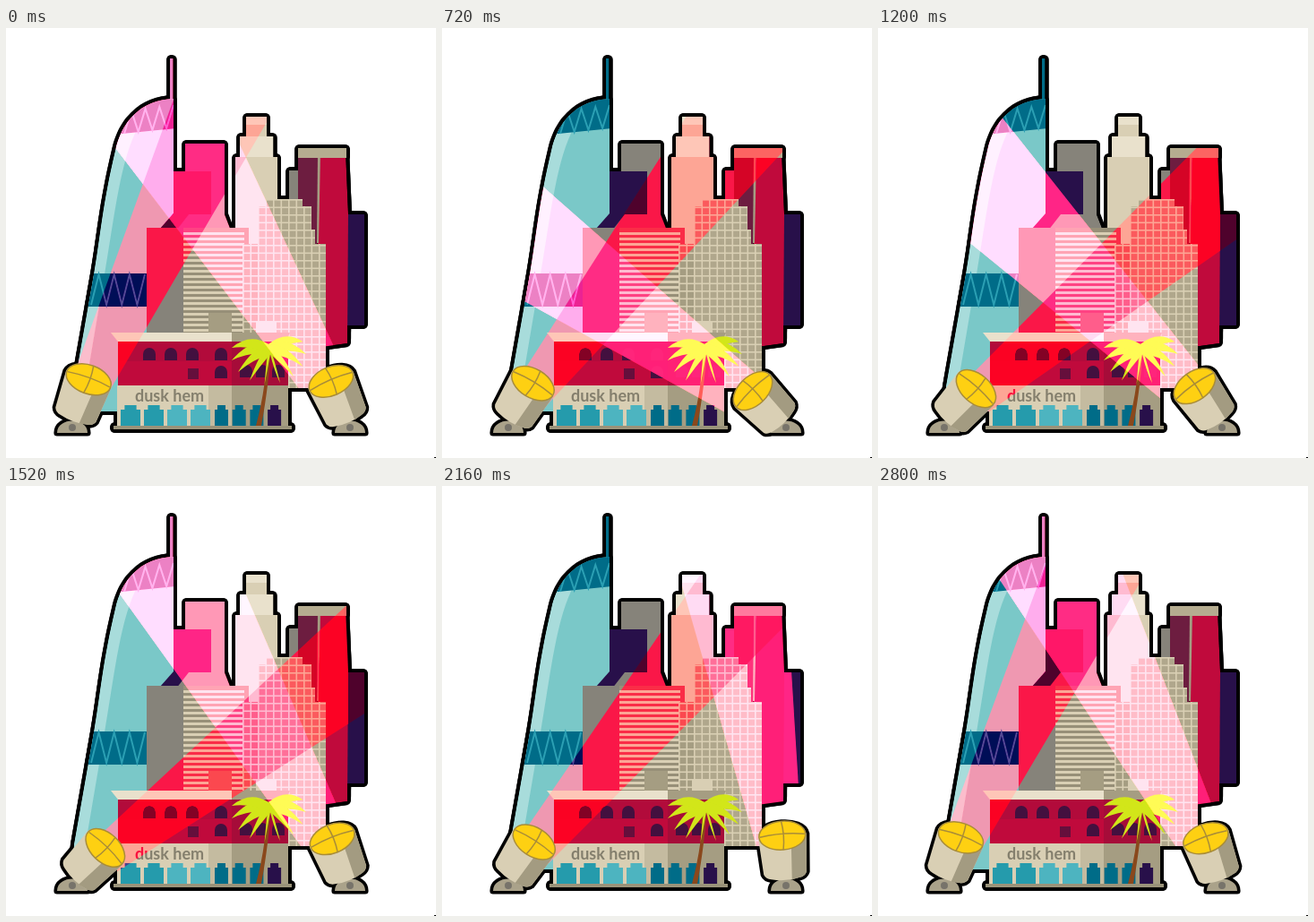
An HTML page with a canvas for the animation above (2.88 s loop, 480 by 480 pixels).

```html
<!DOCTYPE html>
<html lang="en">
<head>
<meta charset="utf-8">
<title>City lights</title>
<style>
html, body { margin: 0; width: 100%; height: 100%; overflow: hidden; background: #fff; }
canvas { display: block; width: 480px; height: 480px; }
</style>
</head>
<body>
<canvas id="stage" width="480" height="480"></canvas>
<script>
const SIZE = 480, LOOP = 2880, STEP = 80, BORDER = 3.6;
const RAD = Math.PI / 180, TAU = 2 * Math.PI;
const BEIGE = '#d9cfb4', PALE = '#e9e1cc', STONE = '#a59d82', GRAY = '#86837a';
const NAVY = '#28104a', TEAL = '#7ac8c8', DEEP = '#006c88', CRIMSON = '#c00a3c';

const makeLayer = () => {
  const c = document.createElement('canvas');
  c.width = c.height = SIZE;
  return c.getContext('2d');
};
const stage = document.getElementById('stage').getContext('2d');
const city = makeLayer(), outline = makeLayer(), lit = makeLayer();

function poly(g, color, ...points) {
  g.beginPath();
  points.forEach(p => g.lineTo(...p));
  g.closePath();
  g.fillStyle = color;
  g.fill();
}
function box(color, x, y, w, h) {
  city.fillStyle = color;
  city.fillRect(x, y, w, h);
}
function fill(g, color, path) {
  g.fillStyle = color;
  g.fill(path);
}
function zigzag(x, width, low, high, rise) {
  const n = 7;
  city.beginPath();
  for (let i = 0; i <= n; i++) city.lineTo(x + width * i / n, (i % 2 ? high : low) - rise * i / n);
  city.strokeStyle = '#2b9fb3';
  city.lineWidth = 2;
  city.stroke();
}

function drawTower() {
  const g = city;
  box(DEEP, 183, 34, 3.5, 50);
  g.save();
  g.clip(new Path2D('M187 79C150 80 129 105 122 137C108 195 105 235 98 275L76 400L74 428H187Z'));
  box(TEAL, 70, 75, 120, 355);
  fill(g, '#a8dcdb', new Path2D('M60 110H148C128 145 122 205 110 275L84 428H60Z'));
  poly(g, DEEP, [110, 70], [190, 70], [190, 112], [110, 120]);
  zigzag(132, 55, 118, 93, 7);
  box(DEEP, 85, 274, 100, 37);
  zigzag(95, 60, 309, 275, 0);
  g.restore();
}

function drawGrid() {
  const g = city, top = 191, pitch = 8.5;
  g.save();
  g.beginPath();
  g.rect(290, top, 41, 20);
  g.rect(281, 199, 60, 60);
  g.rect(281, 225, 64, 20);
  g.rect(264, 241, 93, 161);
  g.clip();
  box('#b0a78c', 260, top, 100, 212);
  box(STONE, 260, top, 21, 212);
  for (let d = 0; d < 212; d += pitch) {
    box(BEIGE, 264 + d, top, 1.6, 212);
    box(BEIGE, 260, top + d, 100, 1.6);
  }
  g.restore();
}

function drawSkyline() {
  const g = city;
  box(GRAY, 200, 129, 44, 90);
  box(NAVY, 187, 160, 42, 49);
  poly(g, NAVY, [187, 207], [210, 207], [210, 224], [172, 224]);
  poly(g, GRAY, [204, 208], [244, 208], [251, 226], [190, 226]);

  box(BEIGE, 256, 144, 47, 106);
  box(PALE, 261, 121, 37.5, 23);
  box(BEIGE, 268, 99, 23, 22);
  box(PALE, 268, 99, 23, 9);

  box(NAVY, 376, 208, 24, 124);
  box(GRAY, 316, 159, 12, 40);
  poly(g, CRIMSON, [350, 135], [379, 135], [382, 207], [381, 352], [345, 357]);
  poly(g, '#6d1d40', [326, 140], [351, 140], [347, 250], [326, 250]);
  poly(g, STONE, [348, 140], [351, 140], [349, 240], [347, 240]);
  box('#b5ac90', 326, 134, 54, 11);

  box(GRAY, 157, 223, 41, 120);
  box('#978f78', 198, 223, 73, 120);
  for (let y = 228; y < 340; y += 6) box(BEIGE, 198, y, 68, 3);
  drawGrid();
  box(STONE, 226, 318, 26, 26);
  box(BEIGE, 279, 328, 23, 16);
}

function arch(x, y) {
  const r = 7;
  city.beginPath();
  city.arc(x + r, y + r, r, Math.PI, 0);
  city.lineTo(x + 2 * r, y + 14);
  city.lineTo(x, y + 14);
  city.fillStyle = '#43103f';
  city.fill();
}
function shopWindow(color, x, w) {
  box(color, x + w * .2, 421, w * .6, 8);
  box(color, x, 426, w, 19);
}

function drawShop() {
  const g = city;
  box('#b20b3b', 125, 348, 127, 24);
  box(CRIMSON, 125, 372, 127, 28);
  box('#a60c39', 252, 348, 63, 52);
  poly(g, PALE, [117, 340], [252, 340], [252, 350], [125, 350]);
  poly(g, STONE, [252, 340], [317, 340], [313, 350], [252, 350]);
  for (let i = 0; i < 3; i++) {
    arch(153 + 24 * i, 357);
    arch(261 + 18 * i, 376);
  }
  box('#650f3c', 203, 380, 12, 12);
  arch(233, 357);
  arch(233, 377);

  box(BEIGE, 124, 399, 102, 46);
  box('#c4bba0', 226, 399, 26, 46);
  box(STONE, 252, 399, 63, 46);
  for (let i = 0; i < 4; i++) shopWindow(i < 2 ? '#259bac' : '#4db4c0', 128 + i * 26, 22);
  for (let i = 0; i < 4; i++) shopWindow(i < 3 ? DEEP : NAVY, 233 + i * 19.7, 15);
  box('#9a937a', 120, 444, 199, 4);
  g.fillStyle = '#847f6d';
  g.font = 'bold 18px Lato, "Open Sans", sans-serif';
  g.fillText('dusk hem', 144, 416.5);
}

function frond(angle) {
  const cx = 293, cy = 358;
  const x = cx + 42 * Math.cos(angle), y = cy + 6 + 34 * Math.sin(angle);
  const lift = 4 + 14 * Math.abs(Math.cos(angle));
  const mx = (cx + x) / 2, my = (cy + y) / 2 - lift;
  city.beginPath();
  city.moveTo(cx, cy - 5);
  city.quadraticCurveTo(mx, my, x, y);
  city.quadraticCurveTo(mx, my + 14, cx + 2, cy + 6);
  city.fillStyle = '#d2e619';
  city.fill();
}
function drawPalm() {
  fill(city, '#8a481c', new Path2D('M290 360Q292 395 279 444H285Q294 395 295 360Z'));
  for (let i = -1; i < 9; i++) frond(Math.PI * i / 7.5);
}

drawTower();
drawSkyline();
drawShop();
drawPalm();

for (let a = 0; a < 360; a += 10)
  outline.drawImage(city.canvas, BORDER * Math.cos(a * RAD), BORDER * Math.sin(a * RAD));
outline.globalCompositeOperation = 'source-in';
outline.fillRect(0, 0, SIZE, SIZE);

// Each lamp swings as a cosine: heading = mean + swing * cos(phase), in degrees from vertical.
const LAMPS = [
  { x: 74, y: 442, dir: 1, mean: 38.7, swing: 13.6, peak: .511, spread: 5.2, lag: 2,
    color: 'rgb(250,16,75)', mode: 'overlay' },
  { x: 384, y: 443, dir: -1, mean: 32.3, swing: 22.6, peak: .258, spread: 6.2, lag: 4,
    color: 'rgb(236,21,60)', mode: 'lighter' }
];
const heading = (lamp, phase) => lamp.mean + lamp.swing * Math.cos(TAU * (phase - lamp.peak));

function drawBeam(lamp, angle) {
  const back = 190, near = back + 45, far = 800;
  const k = Math.tan(lamp.spread * RAD);
  lit.save();
  lit.globalCompositeOperation = lamp.mode;
  lit.translate(lamp.x, lamp.y);
  lit.rotate(angle * lamp.dir * RAD);
  lit.translate(0, back);
  poly(lit, lamp.color, [-near * k, -near], [-far * k, -far], [far * k, -far], [near * k, -near]);
  lit.restore();
}

const BODY = new Path2D('M-27 -53C-25 -72 25 -72 27 -53L24 -11Q22 -6 16 -5Q0 -1 -16 -5Q-22 -6 -24 -11Z');
const SHADE = new Path2D('M27 -53L24 -11Q22 -6 16 -5L7 -3L9 -38Z');
const FOOT = new Path2D('M-17 452C-17 434 17 434 17 452Z');
const RIBS = new Path2D('M-25 -53Q0 -57 25 -53M0 -69Q3 -53 0 -37');

function inLampFrame(lamp, angle, draw) {
  stage.save();
  stage.translate(lamp.x, lamp.y);
  stage.rotate((angle * .88 - lamp.lag) * lamp.dir * RAD);
  draw();
  stage.restore();
}
function drawFoot(lamp, paint) {
  stage.save();
  stage.translate(lamp.x, 0);
  paint();
  stage.restore();
}
function paintFoot() {
  fill(stage, '#aaa28a', FOOT);
  stage.beginPath();
  stage.arc(0, 446, 4, 0, TAU);
  stage.fillStyle = '#77736a';
  stage.fill();
}
function paintLamp() {
  fill(stage, BEIGE, BODY);
  fill(stage, '#a39b81', SHADE);
  stage.beginPath();
  stage.ellipse(0, -53, 26, 16, 0, 0, TAU);
  stage.fillStyle = '#fed012';
  stage.fill();
  stage.strokeStyle = '#a98d38';
  stage.lineWidth = 1.5;
  stage.stroke();
  stage.stroke(RIBS);
}

function render(time) {
  const phase = Math.floor((time % LOOP) / STEP) * STEP / LOOP;
  const angles = LAMPS.map(lamp => heading(lamp, phase));

  lit.globalCompositeOperation = 'copy';
  lit.drawImage(city.canvas, 0, 0);
  LAMPS.forEach((lamp, i) => drawBeam(lamp, angles[i]));
  lit.globalCompositeOperation = 'destination-in';
  lit.drawImage(city.canvas, 0, 0);

  stage.fillStyle = '#fff';
  stage.fillRect(0, 0, SIZE, SIZE);
  stage.drawImage(outline.canvas, 0, 0);
  stage.strokeStyle = '#000';
  stage.lineJoin = 'round';
  stage.lineWidth = 2 * BORDER;
  LAMPS.forEach((lamp, i) => {
    inLampFrame(lamp, angles[i], () => stage.stroke(BODY));
    drawFoot(lamp, () => stage.stroke(FOOT));
  });
  stage.drawImage(lit.canvas, 0, 0);
  LAMPS.forEach((lamp, i) => {
    drawFoot(lamp, paintFoot);
    inLampFrame(lamp, angles[i], paintLamp);
  });
  stage.fillStyle = '#000';
  stage.fillRect(478, 479, 2, 1);
}

function loop() {
  render(performance.now());
  requestAnimationFrame(loop);
}
loop();
</script>
</body>
</html>
```
